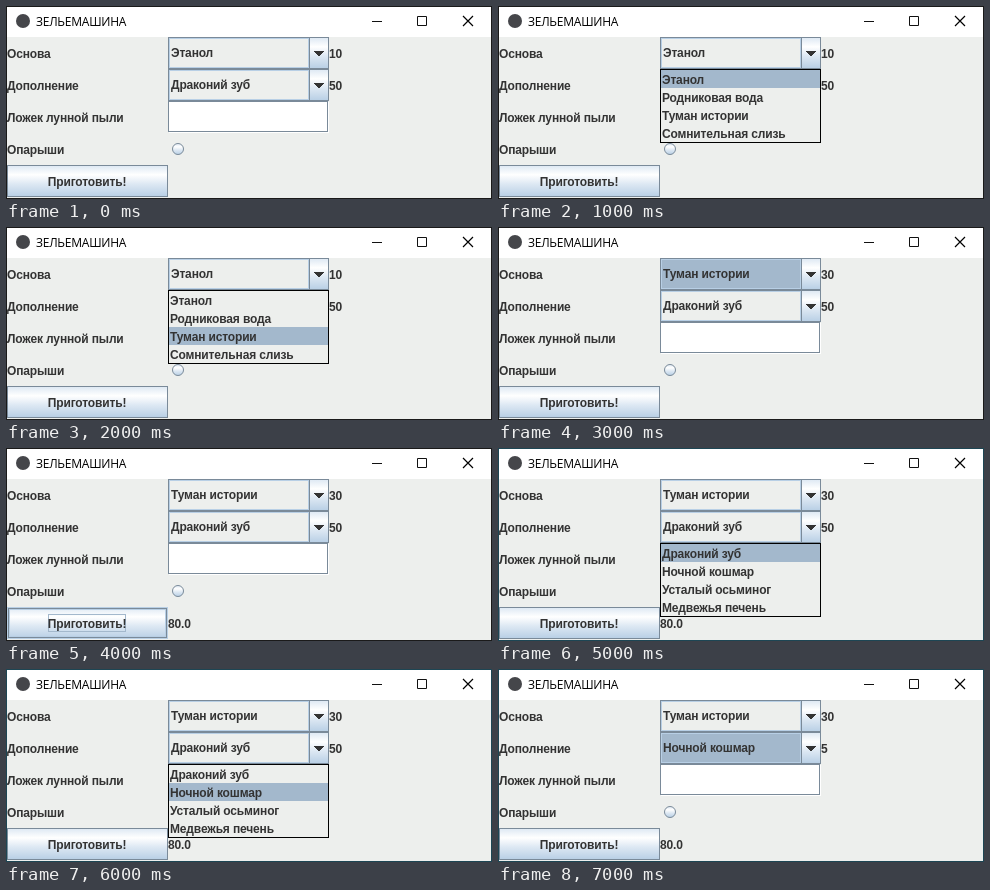
Recreate the animation shown at these times as an HTML page. Size 486x193 px, loop 8 s.

```html
<!DOCTYPE html>
<html lang="ru">
<head>
<meta charset="utf-8">
<style>
html, body { margin: 0; width: 100%; height: 100%; overflow: hidden; }
svg { display: block; }
text { font: bold 12px "Liberation Sans", Arial, sans-serif; letter-spacing: -.15px; fill: #333; }
.title { font: 12px "Open Sans", "Noto Sans", sans-serif; letter-spacing: -.25px; fill: #000; }
</style>
</head>
<body>
<svg id="stage" width="486" height="193" viewBox="0 0 486 193">
  <defs>
    <linearGradient id="ocean" x2="0" y2="1">
      <stop offset="0" stop-color="#dde8f3"/>
      <stop offset=".3" stop-color="#fff"/>
      <stop offset=".6" stop-color="#dde8f3"/>
      <stop offset="1" stop-color="#b8cfe5"/>
    </linearGradient>
  </defs>
  <g id="view"></g>
</svg>
<script>
const BG = '#edefed', DARK = '#7a8a99', LIGHT = '#b8cfe5', SELECTED = '#a3b8cc';
const BASES = ['Этанол', 'Родниковая вода', 'Туман истории', 'Сомнительная слизь'];
const EXTRAS = ['Драконий зуб', 'Ночной кошмар', 'Усталый осьминог', 'Медвежья печень'];
const LABELS = ['Основа', 'Дополнение', 'Ложек лунной пыли', 'Опарыши'];

const text = (x, y, s, attrs = '') => `<text x="${x}" y="${y}" ${attrs}>${s}</text>`;
const fill = (x, y, w, h, color) =>
  `<rect x="${x}" y="${y}" width="${w}" height="${h}" fill="${color}"/>`;
const frame = (x, y, w, h, color, inside = 'none') =>
  `<rect x="${x + .5}" y="${y + .5}" width="${w - 1}" height="${h - 1}" fill="${inside}" stroke="${color}"/>`;

function combo(y, value, focused) {
  return frame(162, y, 142, 32, DARK) +
    frame(163, y + 1, 140, 30, LIGHT, focused ? SELECTED : BG) +
    frame(303, y, 20, 32, DARK, 'url(#ocean)') +
    `<path d="M307.5 ${y + 14}h11l-5.5 5.5z" fill="#333" shape-rendering="crispEdges"/>` +
    text(165, y + 20, value);
}

function popup(y, items, selected) {
  return frame(162, y, 161, 74, '#000', BG) +
    fill(163, y + 1 + selected * 18, 159, 18, SELECTED) +
    items.map((item, i) => text(164, y + 15 + i * 18, item)).join('');
}

function button(active) {
  const border = active
    ? frame(1, 159, 161, 32, LIGHT, 'url(#ocean)') + frame(2, 160, 159, 30, DARK) +
      frame(3, 161, 157, 28, LIGHT) + frame(42, 166, 78, 18, SELECTED)
    : frame(1, 159, 161, 32, DARK, 'url(#ocean)');
  return border + text(81, 180, 'Приготовить!', 'text-anchor="middle"');
}

function titleBar() {
  return fill(1, 1, 484, 30, '#fff') +
    '<circle cx="17" cy="15" r="7" fill="#45464a"/>' +
    text(30, 20, 'ЗЕЛЬЕМАШИНА', 'class="title"') +
    '<path d="M366 15.5h10M411.5 10.5h9v9h-9z" fill="none" stroke="#111"/>' +
    '<path d="M457 10l10 10m0-10l-10 10" stroke="#000" stroke-width="1.2"/>';
}

function scene(step) {
  const mist = step >= 3, nightmare = step >= 7;
  return fill(0, 0, 486, 193, BG) + titleBar() +
    LABELS.map((label, i) => text(1, 52 + i * 32, label)).join('') +
    combo(31, BASES[mist ? 2 : 0], step === 3) +
    combo(63, EXTRAS[nightmare ? 1 : 0], nightmare) +
    text(323, 52, mist ? 30 : 10) + text(323, 84, nightmare ? 5 : 50) +
    fill(163, 96, 160, 31, '#fff') + frame(162, 95, 160, 31, DARK) +
    `<circle cx="172" cy="143" r="5.5" fill="url(#ocean)" stroke="${DARK}"/>` +
    button(step === 4) +
    (step >= 4 ? text(162, 180, '80.0') : '') +
    (step === 1 || step === 2 ? popup(63, BASES, step === 1 ? 0 : 2) : '') +
    (step === 5 || step === 6 ? popup(95, EXTRAS, step - 5) : '') +
    frame(0, 0, 486, 193, step < 5 ? '#1a1a1a' : '#1d4654');
}

const view = document.getElementById('view');
let shown = -1;
function tick() {
  const step = Math.floor(performance.now() / 1000) % 8;
  if (step !== shown) view.innerHTML = scene(shown = step);
  requestAnimationFrame(tick);
}
tick();
</script>
</body>
</html>
```
